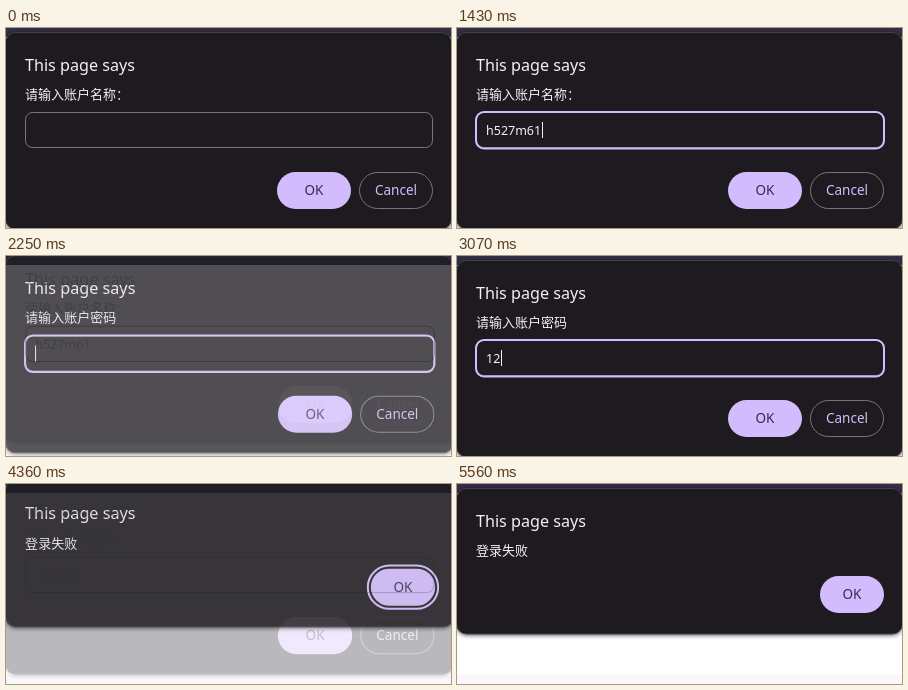
Animation, 445 px wide and 200 px high, one loop 5660 ms. Source, as an HTML page:

```html
<!DOCTYPE html>
<html lang="zh-CN">
<head>
<meta charset="utf-8">
<style>
  html, body { margin: 0; width: 100%; height: 100%; overflow: hidden; background: #fff; }
  svg { display: block; font: 13.5px "Noto Sans", "Noto Sans CJK SC", sans-serif; fill: #f4f0f4; }
  .panel { fill: #1d1b20; stroke: #45424b; filter: drop-shadow(0 1px 2px #0009); }
  .title { font-size: 16.15px; }
  .label { font: 500 13px "Noto Sans CJK SC", "Noto Sans", sans-serif; }
  .value { font-size: 12.5px; }
  .ok, .cancelText { fill: #d3bcfd; }
  .okText { fill: #38284f; }
  .okText, .cancelText { text-anchor: middle; }
  .line { fill: none; stroke: #79747e; }
  .ring { fill: none; stroke: #d3bcfd; stroke-width: 2; }
  #ghost { filter: brightness(0); }
</style>
</head>
<body>
<svg id="stage" width="445" height="200" viewBox="0 0 445 200"></svg>
<script>
const LOOP = 5660;
const stage = document.getElementById('stage');

const rect = (cls, x, y, w, h, r) =>
  `<rect class="${cls}" x="${x}" y="${y}" width="${w}" height="${h}" rx="${r}"/>`;

function dialog(id, label, prompt) {
  const [x, y, w, height] = prompt ? [271, 144, 74, 196.5] : [363, 92, 64, 145.5];
  return `<g id="dialog${id}">
    ${rect('panel', -.5, 4.5, 446, height, 10)}
    <g id="text${id}">
      <text class="title" x="19" y="43">This page says</text>
      <text class="label" x="19" y="71">${label}</text>
      <text class="value" x="29" y="107"></text>
      ${prompt ? rect('line', 19.5, 84.5, 407, 35, 7) : ''}
    </g>
    ${prompt
      ? rect('ring', 19, 84, 408, 36.5, 8) + rect('caret', 29, 94, 1, 16, 0) +
        rect('line', 353.5, 144.5, 73, 36, 18) + '<text class="cancelText" x="390" y="167">Cancel</text>'
      : rect('ring', x - 3, y - 3, w + 6, 43, 21.5)}
    ${rect('ok', x, y, w, 37, 18.5)}
    <text class="okText" x="${x + w / 2}" y="${y + 23}">OK</text>
  </g>`;
}

stage.innerHTML = `
  <rect y="191" width="445" height="9" fill="#f8f8fa"/>
  <rect width="445" height="9" fill="#332f45"/>
  ${dialog(0, '请输入账户名称：', true)}
  ${dialog(1, '请输入账户密码', true)}
  ${dialog(2, '登录失败', false)}
  <use id="ghost"/>`;

const dialogs = [0, 1, 2].map(i => document.getElementById('dialog' + i));
const ghost = document.getElementById('ghost');

// One dialog zooms away upwards while the next settles down into place.
const HANDOVERS = [
  { start: 2150, end: 2300, ease: .78 },
  { start: 4260, end: 4460, ease: .27 }
];

// Every gap, a burst of characters appears.
const TYPING = [
  { text: 'h527m61', from: 1120, gap: 103, burst: 2 },
  { text: '123456', from: 2830, gap: 219, burst: 1 }
];

const clamp = v => Math.max(0, Math.min(1, v));
const within = (t, a, b) => t >= a && t < b;

function place(el, dy, scale, opacity) {
  el.setAttribute('transform', `translate(0 ${dy}) scale(${scale})`);
  el.setAttribute('opacity', opacity);
}

function handOver({ start, end, ease }, i, t) {
  const p = clamp(Math.floor((t - start) / 50) * 50 / (end - start));
  const leave = [-2 - 19 * p, 1 + .007 * p];
  place(dialogs[i], ...leave, (1 - p) ** 1.7);
  place(dialogs[i + 1], -18 * (1 - p) ** 1.2, 1 + .01 * (1 - p), p ** ease);
  if (p < 1) {
    ghost.setAttribute('href', '#text' + i);
    place(ghost, ...leave, .4 * p);
  }
}

function drawField(i, t, ring, caretOn) {
  const { text, from, gap, burst } = TYPING[i];
  const typed = burst * Math.max(0, Math.floor((t - from) / gap) + 1);
  const value = dialogs[i].querySelector('.value');
  const caret = dialogs[i].querySelector('.caret');
  value.textContent = text.slice(0, typed);
  const width = typed ? value.getComputedTextLength() + .4 : 0;
  caret.setAttribute('x', Math.round(29 + width));
  caret.setAttribute('opacity', +caretOn);
  dialogs[i].querySelector('.ring').setAttribute('opacity', ring);
}

function draw(t) {
  dialogs.forEach((el, i) => place(el, 0, 1, i ? 0 : 1));
  place(ghost, 0, 1, 0);
  HANDOVERS.forEach((h, i) => { if (t >= h.start) handOver(h, i, t); });

  const focus = clamp((Math.floor((t - 70) / 44.2) + 1) / 8);
  drawField(0, t, t < 2150 ? focus : 0, within(t, 330, 830) || within(t, 1120, 1970));
  drawField(1, t, +(t < 4260), within(t, 2150, 2730) || within(t, 2830, 4260));
  dialogs[2].querySelector('.ring').setAttribute('opacity', +(t < 5560));
}

const start = performance.now();
function tick() {
  draw((performance.now() - start) % LOOP);
  requestAnimationFrame(tick);
}
tick();
</script>
</body>
</html>
```
